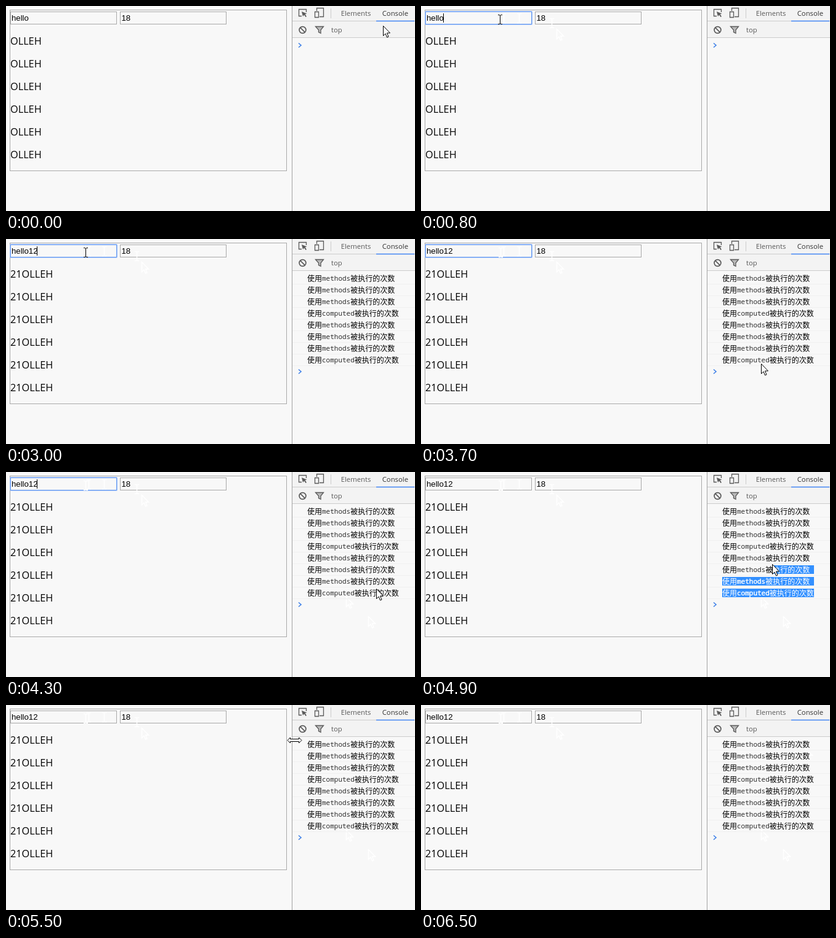
An HTML page for the animation above (6900 ms loop, 664 by 334 pixels).

```html
<!DOCTYPE html>
<html lang="zh-CN">
<head>
<meta charset="utf-8">
<title>methods and computed</title>
<style>
html, body { margin: 0; width: 100%; height: 100%; overflow: hidden; background: #f8f8f8; }
svg { display: block; }
.words { font: 16.3px "Open Sans", sans-serif; fill: #000; }
.field { font: 13.2px "Liberation Sans", sans-serif; fill: #000; }
.tools { font: 11.3px "Open Sans", sans-serif; fill: #5a5a5a; }
.log { font: 12px "Noto Sans CJK SC", "Noto Sans CJK", sans-serif; fill: #000; }
.code { font: 11px "Noto Sans Mono", monospace; fill: #303030; }
.picked, .picked .code { fill: #fff; }
.picked .code { stroke: #fff; stroke-width: .4; }
.icon { fill: none; stroke: #5a5a5a; stroke-width: 1.3; }
.ghosts { --ink: #fff; --paper: none; --line: 1.5; }
#cursor { --ink: #000; --paper: #fff; --line: 1; }
defs path { stroke: var(--ink); fill: var(--paper); stroke-width: var(--line); }
</style>
</head>
<body>
<svg width="664" height="334" viewBox="0 0 664 334">
  <defs>
    <path id="arrow" d="M.5 .5V16.5L4 13L6.5 19L9 18L6.5 12H11.5Z"/>
    <path id="beam" style="fill:none" d="M-3 -7.5H-1L.5 -6.5L2 -7.5H4M.5 -7V7M-3 7.5H-1L.5 6.5L2 7.5H4"/>
    <path id="resize" d="M-11 .5L-6.5 -4V-1.5H7.5V-4L12 .5L7.5 5V2.5H-6.5V5Z"/>
    <clipPath id="clip"><path id="selection"/></clipPath>
  </defs>
  <rect width="664" height="334" fill="#f8f8f8"/>
  <g fill="none" stroke="#a9a9a9">
    <rect x="6.5" y="6.5" width="449" height="262"/>
    <rect x="7.5" y="9.5" width="172" height="20"/>
    <rect x="185.5" y="9.5" width="172" height="20"/>
  </g>
  <g id="focus" fill="none">
    <rect x="6.5" y="8.5" width="174" height="22" rx="1" stroke="#a3c3fa"/>
    <rect x="7.5" y="9.5" width="172" height="20" stroke="#6a9cf0"/>
  </g>

  <path d="M465 0H664V52H465Z" fill="#f3f3f3"/>
  <path d="M464.5 0V334" stroke="#a3a3a3"/>
  <path d="M465 24.5H664M465 51.5H664M527.5 4V20" stroke="#ccc"/>
  <path d="M601 24.5H663" stroke="#4285f4" stroke-width="1.4"/>
  <g class="icon">
    <path d="M480 16.5H475.5V5.5H487.5V10"/>
    <path d="M480 9L488.5 12.5L485.5 13.5L488 17L486.5 18L484 14.5L482 17Z" fill="#5a5a5a" stroke="none"/>
    <path d="M504.5 8V3.5H515.5V17.5H509M501.5 9.5H507.5V18.5H501.5Z"/>
    <circle cx="481.5" cy="39" r="5.4" stroke-width="1.7"/>
    <path d="M477.7 35.2L485.3 42.8" stroke-width="1.7"/>
    <path d="M502.5 33.5H515.5L511 39V44.5L507.5 42.5V39Z" fill="#bbb"/>
  </g>
  <g class="tools">
    <text x="543.7" y="16">Elements</text>
    <text x="610.7" y="16" style="fill:#333">Console</text>
    <text x="528" y="43">top</text>
  </g>

  <g class="ghosts" id="ghosts"></g>
  <g class="words" id="words"></g>
  <text class="field" id="value" x="9" y="24"></text>
  <text class="field" x="187.5" y="24">18</text>
  <path id="caret" d="M.5 12V27" stroke="#000"/>
  <g id="rows"></g>
  <path id="prompt" d="M475 -3.5L479 0L475 3.5" fill="none" stroke="#3f80e8" stroke-width="1.6"/>
  <g clip-path="url(#clip)">
    <path d="M465 53H664V334H465Z" fill="#3390ff"/>
    <g id="pickedRows"></g>
  </g>
  <use id="cursor"/>
</svg>
<script>
const LOOP = 6900, ROW = 19, LOG_X = 489, LOG_END = 638;
const $ = id => document.getElementById(id);
const SVG = 'http://www.w3.org/2000/svg';

function add(parent, tag, attrs, text = '') {
  const node = document.createElementNS(SVG, tag);
  for (const key in attrs) node.setAttribute(key, attrs[key]);
  node.textContent = text;
  return parent.appendChild(node);
}
const show = (node, on) => node.setAttribute('visibility', on ? 'visible' : 'hidden');
const isComputed = row => row % 4 === 3;
const rowY = row => 64 + ROW * row;

// Pointer stops: time, shape, x, y. Each is held until the next.
const stops = [
  [0, 'arrow', 612, 32], [100, 'arrow', 268, 48], [200, 'arrow', 220, 37],
  [400, 'beam', 212, 28], [500, 'beam', 159, 20], [600, 'beam', 134, 20], [700, 'beam', 128, 22],
  [2400, 'beam', 129, 22],
  [3200, 'beam', 145, 25], [3300, 'arrow', 230, 50], [3400, 'arrow', 340, 70],
  [3500, 'arrow', 446, 92], [3600, 'arrow', 515, 170], [3700, 'arrow', 552, 203], [3800, 'arrow', 580, 214],
  [3900, 'arrow', 585, 222], [4000, 'arrow', 588, 235], [4100, 'arrow', 595, 228],
  [4200, 'arrow', 598, 208], [4300, 'arrow', 601, 190], [4400, 'arrow', 612, 189], [4500, 'arrow', 622, 190],
  [4600, 'arrow', 634, 192], [4700, 'arrow', 628, 185], [4800, 'arrow', 600, 170],
  [4900, 'arrow', 570, 150], [5000, 'arrow', 545, 132], [5100, 'arrow', 525, 116], [5200, 'arrow', 515, 106],
  [5300, 'arrow', 512, 88], [5400, 'arrow', 490, 68], [5500, 'resize', 468, 57],
  [5800, 'arrow', 492, 100], [5900, 'arrow', 513, 127],
  [6100, 'arrow', 540, 115], [6200, 'arrow', 590, 95], [6300, 'arrow', 624, 70], [6400, 'arrow', 654, 35],
  [6500, '', 0, 0]
];
// Stops whose pale trace stays behind once the pointer has left.
const traced = [200, 400, 500, 600, 2400, 3700, 4000, 6300];
const caretOn = [[800, 1300], [1500, 2000], [2500, 3500], [4000, 4500]];

const ghosts = stops.flatMap(([time, shape, x, y], i) => traced.includes(time)
  ? [{ from: stops[i + 1][0], node: add($('ghosts'), 'use', { href: '#' + shape, x, y }) }] : []);

const words = Array.from({ length: 6 }, (_, i) => add($('words'), 'text', { x: 7, y: 63 + 37 * i }));

function logText(parent, row, kind) {
  const line = add(parent, 'text', { class: kind, x: LOG_X, y: rowY(row) + 5 }, '使用');
  add(line, 'tspan', { class: 'code', dy: -1 }, isComputed(row) ? 'computed' : 'methods');
  add(line, 'tspan', { dy: 1 }, '被执行的次数');
}
const rows = Array.from({ length: 8 }, (_, row) => {
  const group = add($('rows'), 'g', {});
  add(group, 'path', { d: `M465 ${rowY(row) + 9.5}H664`, stroke: '#f0f0f0' });
  logText(group, row, 'log');
  logText($('pickedRows'), row, 'log picked');
  return group;
});

function selectionPath(x, y) {
  const first = Math.floor((y - 54.5) / ROW);
  let path = '';
  for (let row = first; row < 8; row++) {
    const snapped = 513 + Math.ceil((x - 513) / 6.6) * 6.6;
    const left = row === first ? Math.min(snapped, LOG_END) : LOG_X;
    const right = row < 7 && isComputed(row) ? LOG_END + 7 : LOG_END;
    path += `M${left} ${rowY(row) - 7}H${right}v14H${left}Z`;
  }
  return path;
}

function draw(time) {
  const typed = (time >= 1500) + (time >= 3000);
  const value = 'hello' + '12'.slice(0, typed);
  $('value').textContent = value;
  const reversed = [...value].reverse().join('').toUpperCase();
  words.forEach(word => word.textContent = reversed);

  const logged = typed * 4;
  rows.forEach((row, i) => show(row, i < logged));
  $('prompt').setAttribute('transform', `translate(0 ${rowY(logged)})`);

  show($('focus'), time >= 800 && time < 4600);
  show($('caret'), caretOn.some(([from, to]) => time >= from && time < to));
  $('caret').setAttribute('transform', `translate(${36 + 7 * typed} 0)`);

  const [, shape, x, y] = stops.findLast(stop => stop[0] <= time);
  show($('cursor'), shape);
  $('cursor').setAttribute('href', '#' + shape);
  $('cursor').setAttribute('transform', `translate(${x} ${y})`);
  ghosts.forEach(ghost => show(ghost.node, time >= ghost.from));

  const dragging = time >= 4600 && time < 5300;
  $('selection').setAttribute('d', dragging ? selectionPath(x, y) : '');
}

const start = performance.now();
function tick() {
  draw((performance.now() - start) % LOOP);
  requestAnimationFrame(tick);
}
tick();
</script>
</body>
</html>
```
